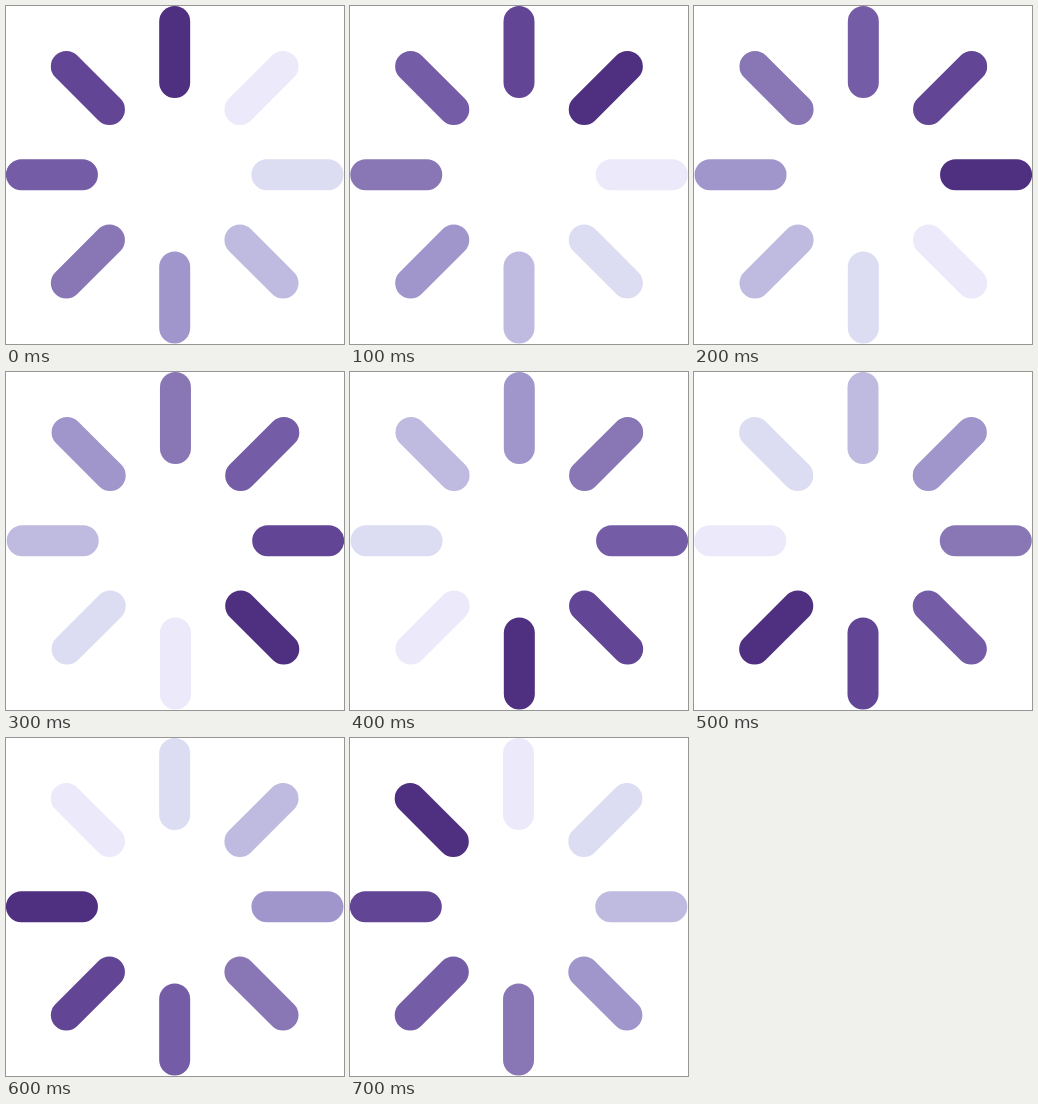
An HTML page for the animation above (800 ms loop, 338 by 338 pixels).

```html
<!DOCTYPE html>
<html lang="en">
<head>
<meta charset="utf-8">
<title>Spinner</title>
<style>
  html, body { margin: 0; width: 100%; height: 100%; overflow: hidden; background: #fff; }
  svg { display: block; width: 100vw; height: 100vh; }
  line { stroke-width: 31; stroke-linecap: round; }
</style>
</head>
<body>
<svg viewBox="0 0 338 338"><g id="wheel"></g></svg>
<script>
const COLORS = ['#4f2f7f', '#624594', '#755ca6', '#8977b5', '#a196cb', '#bfbae0', '#dcdcf2', '#ebe9fa'];
const COUNT = COLORS.length;
const STEP_MS = 100;
const wheel = document.getElementById('wheel');

const bars = COLORS.map((_, k) => {
  const bar = document.createElementNS('http://www.w3.org/2000/svg', 'line');
  bar.setAttribute('y1', -153.25);
  bar.setAttribute('y2', -92.25);
  bar.setAttribute('transform', `rotate(${k * 360 / COUNT})`);
  return wheel.appendChild(bar);
});

function draw(now) {
  const step = Math.floor(now / STEP_MS) % COUNT;
  // the hub wobbles slightly sideways once per turn
  const x = 169 - 0.45 * Math.cos((step + 1) * 2 * Math.PI / COUNT);
  wheel.setAttribute('transform', `translate(${x} 168.75)`);
  bars.forEach((bar, k) => bar.setAttribute('stroke', COLORS[(step - k + COUNT) % COUNT]));
}

const start = performance.now();
function tick() {
  draw(performance.now() - start);
  requestAnimationFrame(tick);
}
tick();
</script>
</body>
</html>
```
